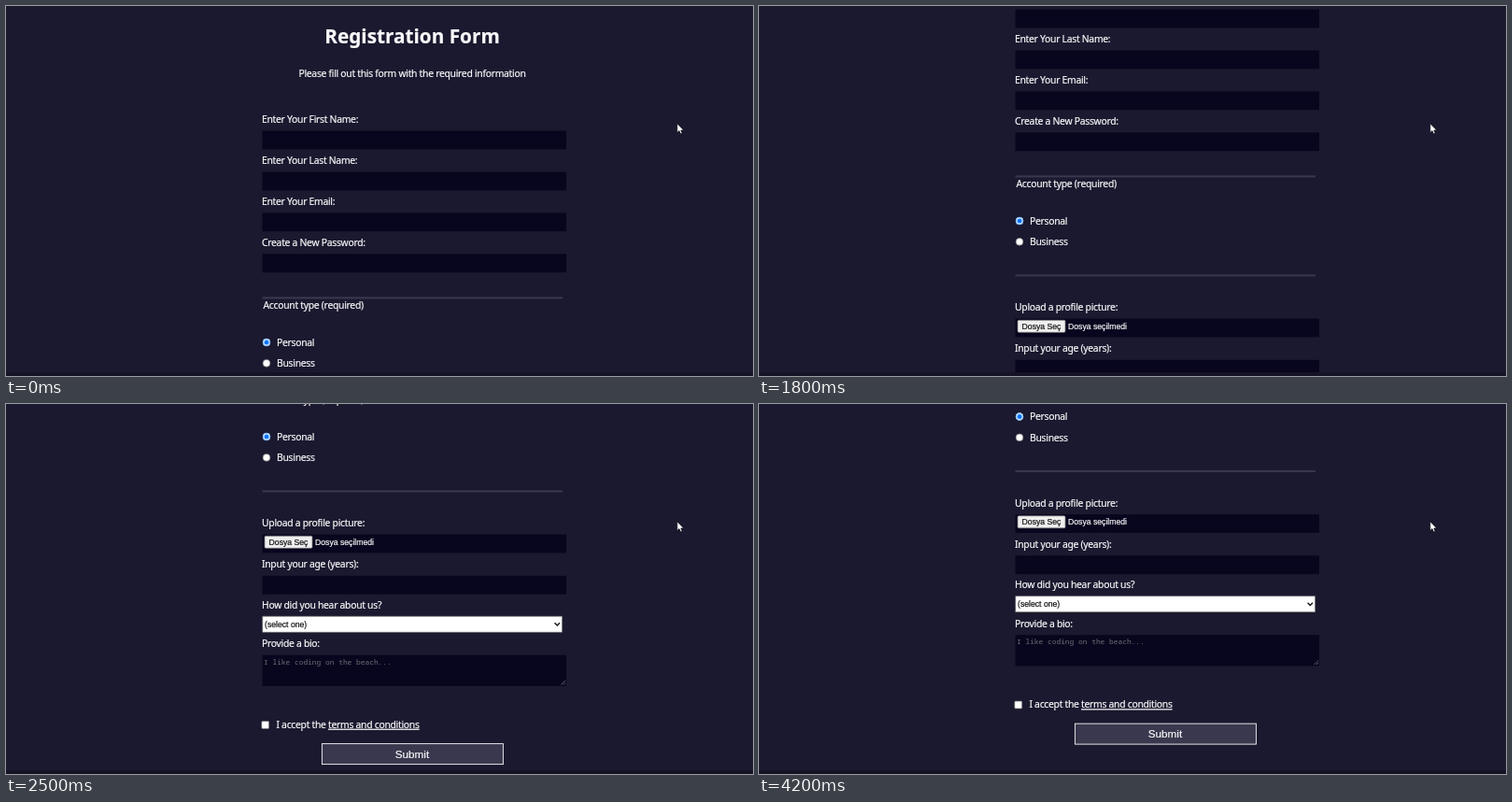
Recreate the animation shown at these times as an HTML page. Size 800 by 396 pixels, loop 4400 ms.

```html
<!DOCTYPE html>
<html lang="en">
<head>
<meta charset="utf-8">
<title>Registration Form</title>
<style>
  html, body { margin: 0; width: 100%; height: 100%; overflow: hidden; background: #1b192f; }
  svg { display: block; width: 800px; height: 396px; }
  text {
    color: #f8f8fa; fill: currentColor; stroke: currentColor; stroke-width: .2px; white-space: pre;
    font: 10.4px "Noto Sans", "Open Sans", sans-serif; letter-spacing: -.3px;
  }
  .title { font-size: 20.75px; font-weight: 700; letter-spacing: 0; }
  .control { font: 8.67px "Liberation Sans", Arial, sans-serif; letter-spacing: 0; }
  .submit { font-size: 11.7px; }
  .dark { color: #111; }
  .hint { font: 7.87px "Noto Sans Mono", monospace; letter-spacing: 0; color: #6f6f74; stroke: none; }
  .middle { text-anchor: middle; }
  .field { fill: #08051e; }
  .rule { fill: #3a384e; }
  .box { fill: #fff; stroke: #767676; stroke-width: .7; }
</style>
</head>
<body>
<svg viewBox="0 0 800 396">
  <g id="page"></g>
  <rect y="392" width="800" height="4" fill="#151226"/>
  <path d="M718.8 125.8v9.8l2.2-2 1.5 3.3 1.7-.7-1.4-3.2h3z" fill="#fff" stroke="#08060f" stroke-width=".7"/>
</svg>
<script>
const LOOP = 4400, FRAME = 100, GLIDE = 200;
// Each wheel notch: start time in ms and distance in px.
const notches = [[940, 65], [1600, 65], [1800, 65], [1900, 65], [2250, 65], [2780, 21.5]];

const text = (x, y, words, style = '') => `<text x="${x}" y="${y}" class="${style}">${words}</text>`;
const rect = (x, y, w, h, style, extra = '') =>
  `<rect x="${x}" y="${y}" width="${w}" height="${h}" class="${style}" ${extra}/>`;
const field = (y, h = 19.8) => rect(274.5, y, 325.5, h, 'field');
const rule = y => rect(274.5, y, 321.5, 2, 'rule');
const labelled = (y, words) => text(274, y, words) + field(y + 8.6);

const radio = (y, words, checked) =>
  `<circle cx="279" cy="${y}" r="3.9" class="box"/>` +
  (checked ? `<circle cx="279" cy="${y}" r="3.9" fill="#fff" stroke="#3b93f7" stroke-width=".7"/>
              <circle cx="279" cy="${y}" r="2.5" fill="#0075ff"/>` : '') +
  text(290, y + 3.8, words);

const page = document.getElementById('page');
page.innerHTML = [
  text(435, 40.4, 'Registration Form', 'title middle'),
  text(435, 76, 'Please fill out this form with the required information', 'middle'),
  labelled(125, 'Enter Your First Name:'),
  labelled(169, 'Enter Your Last Name:'),
  labelled(212.8, 'Enter Your Email:'),
  labelled(256.8, 'Create a New Password:'),

  rule(311.4),
  text(275.5, 324, 'Account type (required)'),
  radio(360, 'Personal', true),
  radio(382.3, 'Business', false),
  rule(417.4),

  labelled(456, 'Upload a profile picture:'),
  rect(277, 466.3, 51, 13, 'box', 'rx="1.3" style="fill:#efefef"'),
  text(281.6, 475.6, 'Dosya Seç', 'control dark'),
  text(331, 475.6, 'Dosya seçilmedi', 'control'),
  labelled(500.2, 'Input your age (years):'),

  text(274, 543.8, 'How did you hear about us?'),
  rect(274.8, 552.2, 320.8, 17, 'box'),
  text(277, 563.7, '(select one)', 'control dark'),
  '<path d="M587.6 559.2l2.7 2.7 2.7-2.7" fill="none" stroke="#111" stroke-width="1.4"/>',

  text(274, 585.4, 'Provide a bio:'),
  field(593.7, 33.1),
  text(276, 603.6, 'I like coding on the beach...', 'hint'),
  '<path d="M594.5 625.5l4.5-4.5M597 625.5l2-2" stroke="#85838f" stroke-width=".7"/>',

  rect(273.8, 664.6, 7.8, 7.8, 'box', 'rx="1"'),
  text(289.5, 671.8, 'I accept the <tspan text-decoration="underline">terms and conditions</tspan>'),
  rect(338.4, 688.6, 194, 22, 'rule', 'stroke="#f5f6f7" stroke-width=".9"'),
  text(435, 703.6, 'Submit', 'control submit middle')
].join('');

const easeInOut = p => p * p * (3 - 2 * p);
const scrollAt = time => notches.reduce((sum, [start, distance]) =>
  sum + distance * easeInOut(Math.min(1, Math.max(0, (time - start) / GLIDE))), 0);

function draw() {
  const time = performance.now() % LOOP;
  const stepped = Math.floor(time / FRAME) * FRAME;
  page.setAttribute('transform', `translate(0 ${-scrollAt(stepped)})`);
  requestAnimationFrame(draw);
}
draw();
</script>
</body>
</html>
```
